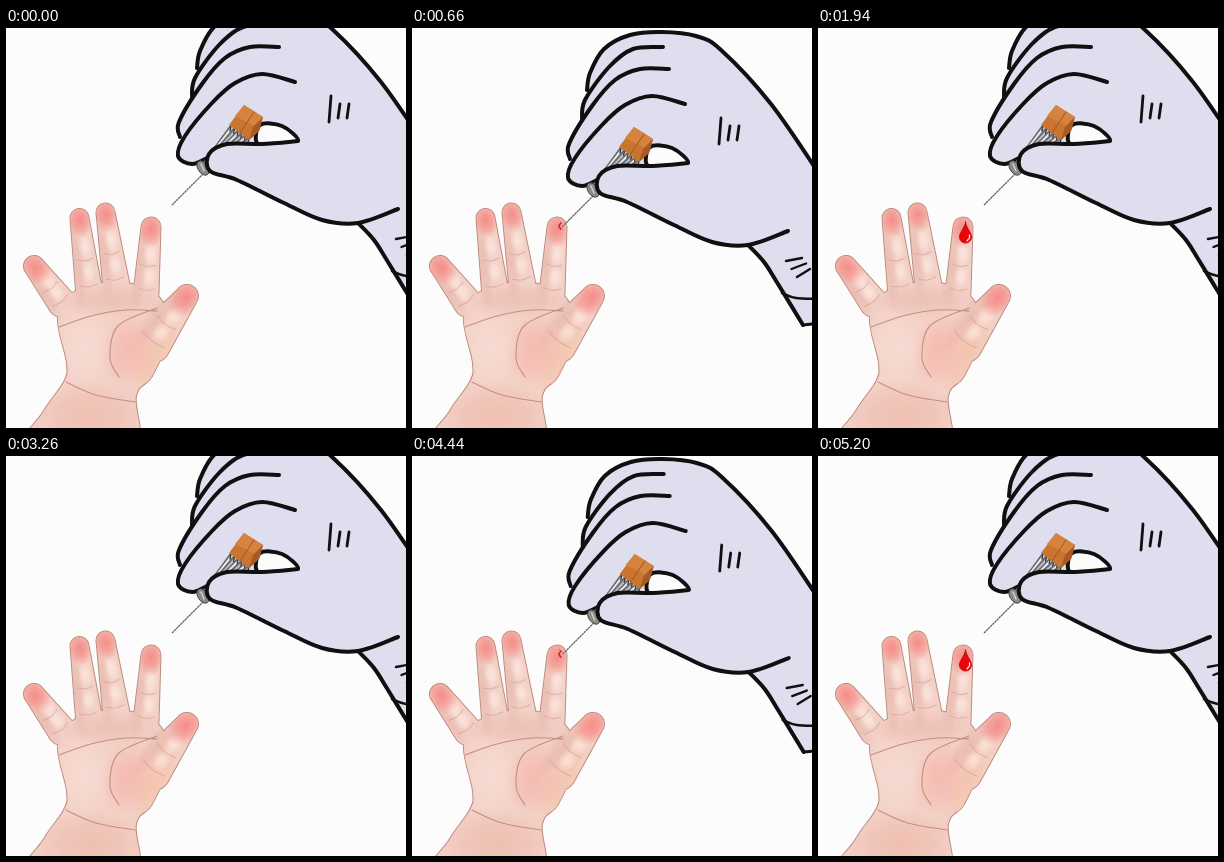
These frames come from a looping animation (400x400 px, 6.52 s). An HTML page with a canvas:

```html
<!DOCTYPE html>
<html lang="en">
<head>
<meta charset="utf-8">
<title>Finger prick</title>
<style>
html, body { margin: 0; width: 100%; height: 100%; overflow: hidden; background: #fcfcfc; }
canvas { display: block; width: 400px; height: 400px; }
</style>
</head>
<body>
<canvas id="stage" width="400" height="400"></canvas>
<script>
const ctx = document.getElementById('stage').getContext('2d');
const CYCLE = 3260, STEP = 20, MOVE = 660, RETREAT = 1160;
const PAPER = '#fcfcfc', GLOVE = '#dedeef', INK = '#101010';
const SKIN = '#f3d1c7', SKIN_LINE = '#bd8b7e', BLUSH = '245,118,114', SHADE = '222,160,148', LIGHT = '255,240,234';

const clamp = (v) => Math.max(0, Math.min(1, v));
const mix = (a, b, k) => a + (b - a) * k;

// Smooth curve through points given as "x,y x,y ..."
function curve(text, closed) {
  const p = text.split(' ').map((s) => s.split(',').map(Number));
  const n = p.length;
  const at = (i) => closed ? p[(i + n) % n] : p[Math.max(0, Math.min(n - 1, i))];
  const path = new Path2D();
  path.moveTo(...p[0]);
  for (let i = 0; i < (closed ? n : n - 1); i++) {
    const [a, b, c, d] = [at(i - 1), at(i), at(i + 1), at(i + 2)];
    path.bezierCurveTo(
      b[0] + (c[0] - a[0]) / 6, b[1] + (c[1] - a[1]) / 6,
      c[0] - (d[0] - b[0]) / 6, c[1] - (d[1] - b[1]) / 6, c[0], c[1]);
  }
  if (closed) path.closePath();
  return path;
}

const polygon = (text) => new Path2D('M' + text.split(' ').join('L') + 'Z');

function fill(path, color) {
  ctx.fillStyle = color;
  ctx.fill(path);
}

function stroke(path, color, width) {
  ctx.strokeStyle = color;
  ctx.lineWidth = width;
  ctx.stroke(path);
}

function line(x1, y1, x2, y2, color, width) {
  stroke(new Path2D(`M${x1},${y1}L${x2},${y2}`), color, width);
}

// Soft elliptical tint
function blob(x, y, rx, ry, rgb, alpha, angle = 0) {
  ctx.save();
  ctx.translate(x, y);
  ctx.rotate(angle);
  ctx.scale(rx, ry);
  const g = ctx.createRadialGradient(0, 0, 0, 0, 0, 1);
  g.addColorStop(0, `rgba(${rgb},${alpha})`);
  g.addColorStop(0.5, `rgba(${rgb},${alpha * 0.65})`);
  g.addColorStop(1, `rgba(${rgb},0)`);
  ctx.fillStyle = g;
  ctx.fillRect(-1, -1, 2, 2);
  ctx.restore();
}

// A finger is a tapered capsule from tip to base
const finger = (x, y, r, bx, by, br) =>
  ({ x, y, r, bx, by, br, angle: Math.atan2(y - by, x - bx) + Math.PI / 2 });

const fingers = [
  finger(28, 238, 10, 56, 275, 14),
  finger(73.5, 190, 9, 83, 262, 13),
  finger(99.5, 184.5, 9, 110, 255, 13),
  finger(145, 199, 9.5, 140, 265, 12.5),
  finger(181, 268, 11, 145, 315, 20)
];

const babyHand = curve(`14,430 38,383 58,354 61,335 52,290 68,264 112,254 152,268 163,305 146,348 130,368 126,430`, true);
for (const f of fingers) {
  const part = new Path2D();
  part.arc(f.x, f.y, f.r, f.angle - Math.PI, f.angle);
  part.arc(f.bx, f.by, f.br, f.angle, f.angle + Math.PI);
  part.closePath();
  babyHand.addPath(part);
}

const creases = [
  '53,299 85,288 120,282 151,283',
  '151,280 112,298 104,330 113,349',
  '60,354 90,367 129,374'
].map((s) => curve(s));

function shadeFinger(f) {
  const length = Math.hypot(f.x - f.bx, f.y - f.by);
  ctx.save();
  ctx.translate(f.x, f.y);
  ctx.rotate(f.angle);
  blob(-f.r, length * 0.6, f.r, length * 0.7, SHADE, 0.4);
  blob(2, length * 0.4, f.r * 0.8, 13, LIGHT, 0.6);
  blob(2, length * 0.75, f.r * 0.8, 11, LIGHT, 0.6);
  blob(0, 2, f.r * 1.5, f.r * 2, BLUSH, 0.75);
  for (const k of [0.57, 0.93]) {
    const w = mix(f.r, f.br, k) * 0.7;
    stroke(curve(`${-w},${length * k} 0,${length * k + 2} ${w},${length * k}`), 'rgba(196,140,126,.45)', 1);
  }
  ctx.restore();
}

function drawBabyHand() {
  stroke(babyHand, SKIN_LINE, 2);
  fill(babyHand, SKIN);
  ctx.save();
  ctx.clip(babyHand);
  blob(105, 272, 58, 18, SHADE, 0.3);
  blob(78, 320, 30, 42, LIGHT, 0.3);
  blob(84, 388, 60, 35, '236,176,160', 0.55);
  blob(150, 325, 18, 55, '244,190,160', 0.6, 0.4);
  blob(122, 322, 27, 38, '247,165,155', 0.5, 0.2);
  fingers.forEach(shadeFinger);
  ctx.restore();
  creases.forEach((c) => stroke(c, '#c48f82', 1.1));
}

const drop = new Path2D('M147.5 194C147 200 141.5 204 141.5 209A6 6 0 0 0 153.5 209C153.5 204 148 200 147.5 194Z');
const glint = curve('151.5,207 151.4,210 149,212.7');
const prick = curve('149,195 147,198 148,200 149,201');

function drawDrop(reveal, bright) {
  ctx.save();
  ctx.beginPath();
  ctx.rect(138, 193, 18, 23 * reveal);
  ctx.clip();
  fill(drop, `rgb(${mix(190, 235, bright)},${mix(12, 4, bright)},${mix(18, 8, bright)})`);
  stroke(drop, '#b40c14', 0.9);
  stroke(glint, '#ffe3e3', 1.3);
  ctx.restore();
}

const backOfHand = '175,62 178,45 192,21 218,7 250,4 284,8 309,22 359,76 408,147';
const outerEdge = curve(backOfHand);
const gloveBody = curve(backOfHand + ' 420,200 336,212 262,190 195,152 162,150 166,115 174,90', true);
const gloveFingers = [
  '170,92 173,72 197,39 221,21 251,19',
  '158,131 157,116 180,78 203,52 228,41 257,41',
  '187,151 170,158 156,150 163,130 190,97 213,77 240,68 273,76'
].map((s) => curve(s));
const hole = curve('238,119 260,120 276,135 252,138 235,137', true);
const thumb = curve('276,135 240,138 205,138 187,148 188,165 215,174 262,197 300,214 336,217 376,203');
const wrist = polygon('336,217 366,256 391,297 410,295 430,150');
const wristEdge = curve('336,217 352,234 366,256 391,297');
const cuff = curve('370,265 384,270 408,271');

function drawLancet() {
  for (let i = 0; i < 6; i++) {
    const x = 209 + i * 3.6, y = 120 + i * 2.4;
    line(x, y, 182 + i, 157 + i, '#66676b', 2.6);
    line(x + 0.8, y + 1, 182.5 + i, 157 + i, i % 2 ? '#b4b4b8' : '#ececee', 1.5);
    line(x, y, x - 1, y + 5, '#3a3a3e', 1.4);
  }
  fill(polygon('222,99 241,111 237,125 227,134 207,119'), '#c9752f');
  fill(polygon('222,99 241,111 233,120 213,110'), '#d5833f');
  fill(polygon('241,111 237,125 227,134 231,121'), '#a65a25');
  line(232, 106, 218, 127, '#9c5522', 1);
}

function drawNeedle() {
  line(183, 166, 150, 199, '#b0b0b0', 1.1);
  ctx.setLineDash([1, 2]);
  line(183, 166, 150, 199, '#555', 1.1);
  ctx.setLineDash([]);
  const hub = new Path2D();
  hub.ellipse(181, 162, 5, 8, -0.6, 0, Math.PI * 2);
  fill(hub, '#8c8a86');
  stroke(hub, '#45423f', 1);
  line(179, 158, 182, 165, '#d2d0cc', 1.5);
}

function drawGlove(dx, dy) {
  const outline = (path) => stroke(path, INK, 4);
  ctx.save();
  ctx.translate(dx, dy);
  [gloveBody, wrist, ...gloveFingers].forEach((path) => fill(path, GLOVE));
  fill(hole, PAPER);
  [hole, outerEdge, ...gloveFingers].forEach(outline);
  drawLancet();
  drawNeedle();
  fill(thumb, GLOVE);
  [thumb, wristEdge].forEach(outline);
  line(391, 297, 410, 295, INK, 3);
  stroke(cuff, INK, 2.5);
  for (let i = 0; i < 3; i++) {
    line(309 + 9 * i, i ? 98 : 90, 307 + 9 * i, i ? 112 : 116, INK, 2.8);
    line(374 + 5.5 * i, 233 + 8 * i, 390 + 4 * i, 230 + 5.5 * i, INK, 2.4);
  }
  ctx.restore();
}

function render(ms) {
  const t = Math.floor(ms % CYCLE / STEP) * STEP;
  const approach = clamp(t / MOVE);
  const retreat = t > RETREAT + STEP / 2 && t >= 1180 ? clamp((t - RETREAT) / MOVE) : 0;
  const away = 1 - approach * Math.pow(1 - Math.pow(retreat, 1.2), 3);

  ctx.fillStyle = PAPER;
  ctx.fillRect(0, 0, 400, 400);
  ctx.lineCap = ctx.lineJoin = 'round';
  drawBabyHand();
  drawDrop(retreat, clamp((t - 1820) / 120));
  drawGlove(16 * away, -22 * away);
  if (approach === 1 && retreat < 0.25) stroke(prick, '#d51f28', 1.6);
}

const start = performance.now();
function frame() {
  render(performance.now() - start);
  requestAnimationFrame(frame);
}
frame();
</script>
</body>
</html>
```
